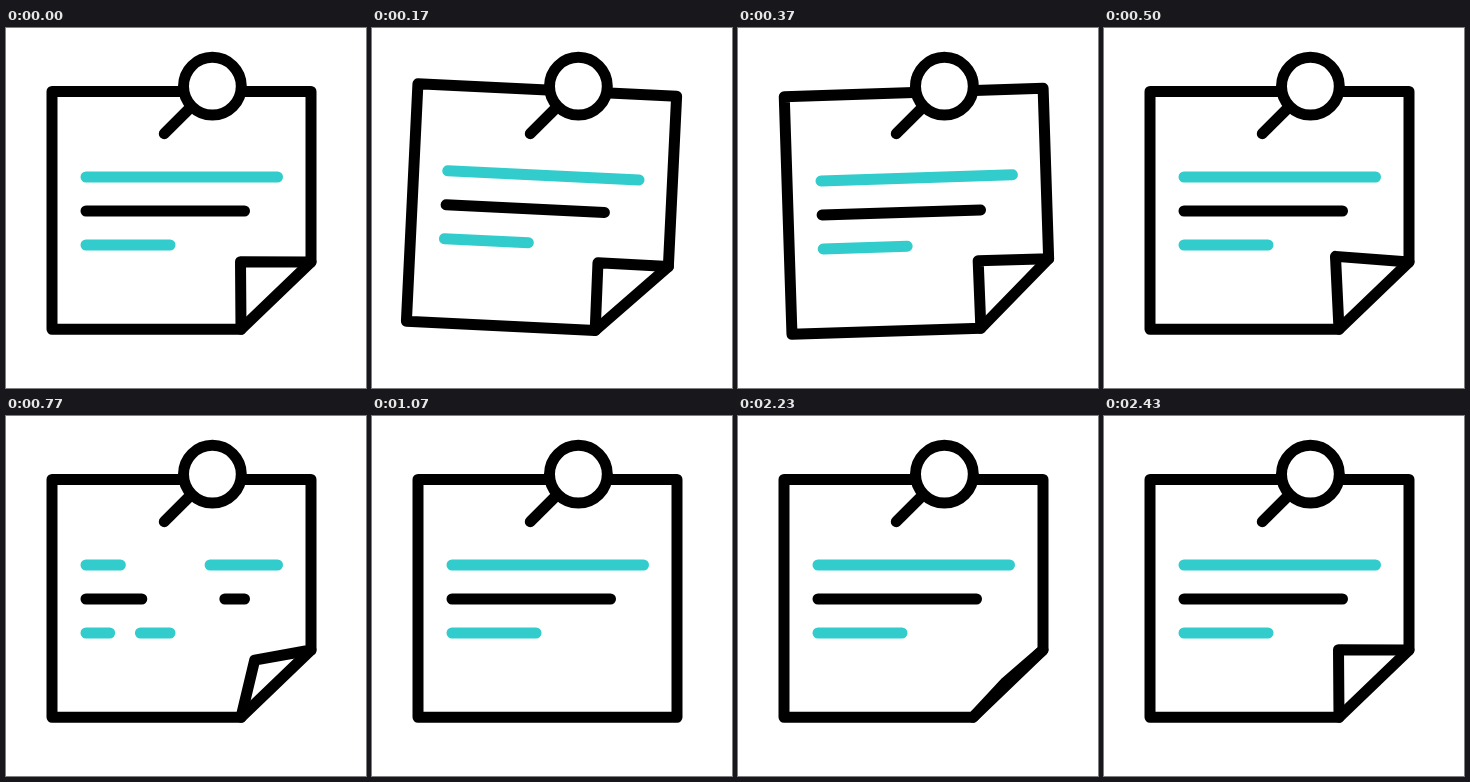
Write an HTML page that moves like this. It is 360x360 px and loops after 2.5 s.

```html
<!DOCTYPE html>
<html lang="en">
<head>
<meta charset="utf-8">
<title>Pinned note</title>
<style>
  html, body { margin: 0; width: 100%; height: 100%; overflow: hidden; background: #fff; }
  svg { display: block; width: 100%; height: 100%; }
  path, circle { fill: none; stroke: #000; stroke-width: 11; stroke-linecap: round; stroke-linejoin: round; }
  .teal { stroke: #33cccc; }
  circle { fill: #fff; }
</style>
</head>
<body>
<svg viewBox="0 0 360 360">
  <g id="note">
    <path id="sheet"/>
    <path id="crease" d="M305 234L235 301.3"/>
    <path class="teal line"/>
    <path class="line"/>
    <path class="teal line"/>
  </g>
  <path d="M184 80L158.3 105.7"/>
  <circle cx="206.4" cy="58.2" r="28.9"/>
</svg>
<script>
const LOOP = 2500, FPS = 30;
const note = document.getElementById('note');
const sheet = document.getElementById('sheet');
const crease = document.getElementById('crease');
const lineEls = document.querySelectorAll('.line');

// Key lists hold [frame, value] pairs, eased in and out between keys.
const swing = [[1, 0], [6, 3.1], [10, -2.2], [14, 0]];
const tipX = [[11, 234.5], [18.5, 229], [32, 305], [60.6, 305], [73, 234.5]];
const tipY = [[11, 233.7], [18.5, 224], [32, 301.3], [60.6, 301.3], [73, 233.7]];
const drawIn = [[19, 0], [29, 1]];

// Each line is wiped from one end while it is redrawn behind the gap.
const lines = [
  { from: 271.5, to: 80, y: 149, wipe: 15.7 },
  { from: 80, to: 238.5, y: 183, wipe: 15.2 },
  { from: 164, to: 80, y: 217, wipe: 16.5 }
];

const ease = u => u * u * (3 - 2 * u);

function at(keys, f) {
  if (f <= keys[0][0]) return keys[0][1];
  for (let i = 1; i < keys.length; i++) {
    const [f0, a] = keys[i - 1], [f1, b] = keys[i];
    if (f < f1) return a + (b - a) * ease((f - f0) / (f1 - f0));
  }
  return keys[keys.length - 1][1];
}

function linePath({ from, to, y, wipe }, f) {
  const x = u => from + (to - from) * u;
  const head = at(drawIn, f);
  const tail = at([[wipe, 0], [wipe + 10, 1]], f);
  let d = '';
  if (head > 0) d += `M${from} ${y}H${x(head)}`;
  if (tail < 1) d += `M${x(tail)} ${y}H${to}`;
  return d;
}

function draw(ms) {
  const f = Math.floor((ms % LOOP) * FPS / 1000 + 0.15);
  const x = at(tipX, f), y = at(tipY, f);
  note.setAttribute('transform', `rotate(${at(swing, f)} 206.4 58.2)`);
  sheet.setAttribute('d', `M235 301.3H46V63.5H305V234L${x} ${y}Z`);
  crease.style.display = x + y < 537.5 ? '' : 'none';
  lines.forEach((line, i) => lineEls[i].setAttribute('d', linePath(line, f)));
}

const start = performance.now();
function tick() {
  draw(performance.now() - start);
  requestAnimationFrame(tick);
}
tick();
</script>
</body>
</html>
```
